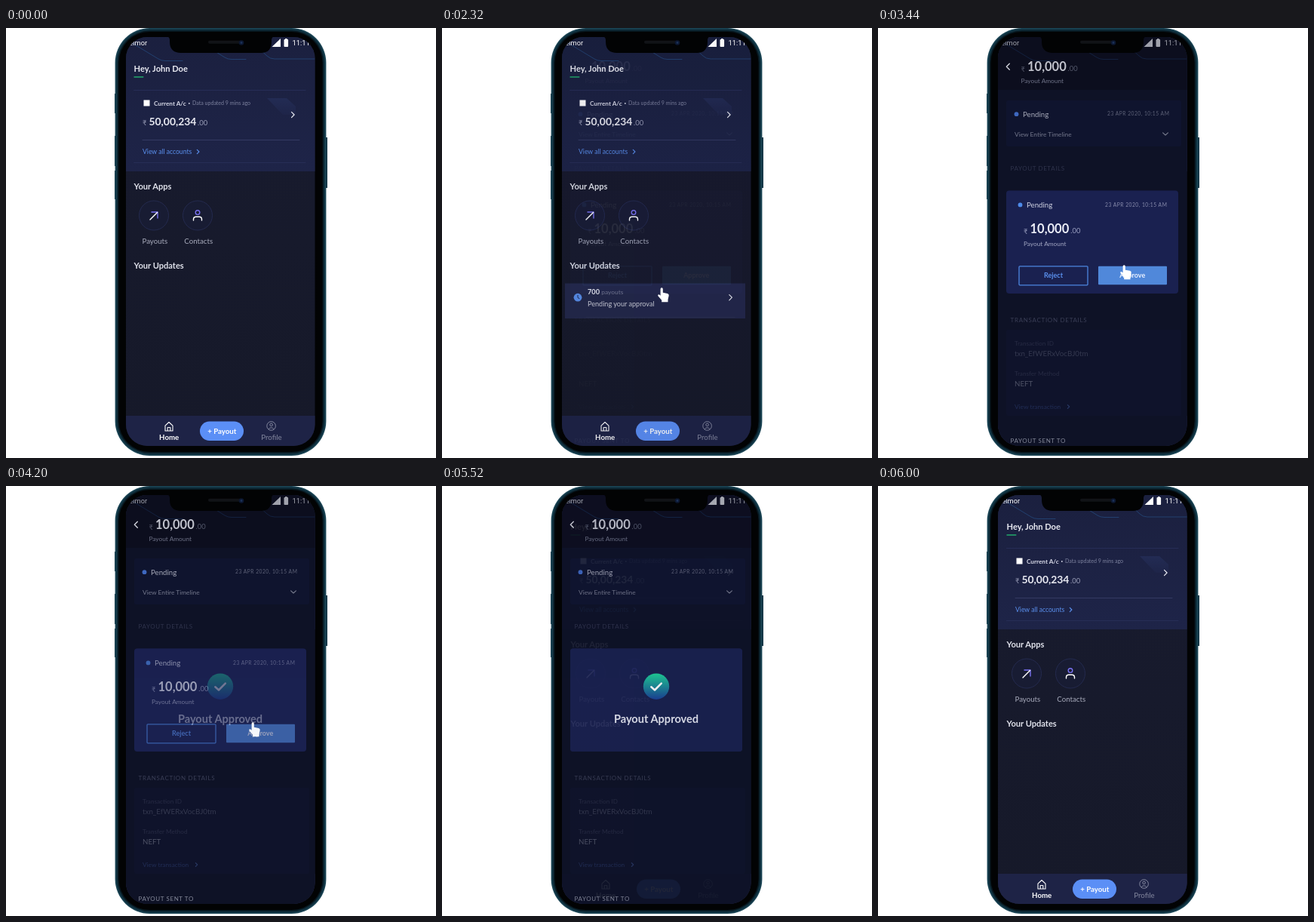
Write an HTML page that moves like this. It is 570 by 570 pixels and loops after 6040 ms.

```html
<!DOCTYPE html>
<html lang="en">
<head>
<meta charset="utf-8">
<title>Payout approval</title>
<style>
  html, body { margin: 0; width: 100%; height: 100%; overflow: hidden; background: #fff; }
  svg { display: block; width: 100vw; height: 100vh; }
  text { font-family: Lato, "Noto Sans", sans-serif; white-space: pre; }
  .status { font-family: Roboto, sans-serif; }
</style>
</head>
<body>
<svg id="stage" viewBox="0 0 570 570"></svg>
<script>
const LOOP = 6040, STEP = 40, FADE = 520;

// Markup helpers
const text = (x, y, size, fill, str, { w = 400, anchor = 'start', ls = 0, cls = '' } = {}) =>
  `<text x="${x}" y="${y}" font-size="${size}" fill="${fill}" font-weight="${w}" text-anchor="${anchor}" letter-spacing="${ls}" class="${cls}">${str}</text>`;
const rect = (x, y, w, h, fill, r = 0, extra = '') =>
  `<rect x="${x}" y="${y}" width="${w}" height="${h}" rx="${r}" fill="${fill}" ${extra}/>`;
const dot = (x, y, r, fill, extra = '') => `<circle cx="${x}" cy="${y}" r="${r}" fill="${fill}" ${extra}/>`;
const line = (d, stroke, w = 1) =>
  `<path d="${d}" fill="none" stroke="${stroke}" stroke-width="${w}" stroke-linecap="round" stroke-linejoin="round"/>`;
const right = (x, y, s, stroke, w = 1.2) => line(`M${x - s / 2} ${y - s}l${s} ${s}l${-s} ${s}`, stroke, w);
const group = (id, body) => `<g id="${id}">${body}</g>`;
const bold = { w: 700 }, mid = { anchor: 'middle' }, boldMid = { w: 700, anchor: 'middle' };

const statusBar = c =>
  text(187, 23.3, 9.2, c, 'Zelmor', { anchor: 'end', cls: 'status' }) +
  `<path d="M352.5 25L364 14V25Z" fill="${c}"/>` +
  rect(368.5, 15, 5.6, 10, c, 1) + rect(370, 14, 2.6, 2, c) +
  text(379.5, 23.3, 9.4, c, '11:11', { cls: 'status' });

const circuit = c =>
  line('M164 18L202 41Q206 43.5 211 43.5H234', c) +
  line('M266 24L290 39Q294 41.5 299 41.5H318', c) +
  line('M332 24L346 37Q350 41 356 41H409', c);

const amount = (x, y, size, main, dim, rupeeX, centsX, str) =>
  text(rupeeX, y + .5, 9.2, dim, '₹') +
  text(x, y, size, main, str, bold) +
  text(centsX, y, 9.4, dim, '.00');

const date = (x, y, c) => text(x, y, 6.7, c, '23 APR 2020, 10:15 AM', { ls: .5 });

const homeMarkup =
  rect(158, 11, 253, 545, 'url(#page)') +
  rect(158, 11, 253, 179, 'url(#header)') +
  circuit('#22406f') + statusBar('#fff') +
  text(169.5, 58, 11.1, '#e9eaf2', 'Hey, John Doe', bold) +
  rect(169.5, 64.2, 12.8, 1.5, '#22a86a') +
  line('M169.5 82.5H397M169.5 178.5H397', '#262d56') +
  `<path d="M346 93H372L384 104V115H367Z" fill="url(#sheen)"/>` +
  rect(182.5, 95.5, 8, 8, '#fff') +
  text(196, 102.6, 8.2, '#d8dae8', 'Current A/c', bold) +
  dot(242.8, 100, .9, '#d8dae8') +
  text(247, 102.3, 7.05, '#7d829f', 'Data updated 9 mins ago') +
  right(380.3, 115, 3.6, '#e9eaf2') +
  amount(189.5, 128.8, 13.9, '#e9eaf2', '#9a9eb8', 181, 254, '50,00,234') +
  line('M181 148.5H389', '#343a62') +
  text(181, 166.8, 8.6, '#5a90ee', 'View all accounts') +
  right(254.6, 164, 2.6, '#5a90ee', 1.1) +
  text(169.5, 214, 11.1, '#dfe1ea', 'Your Apps', bold) +
  [196, 254].map(x => dot(x, 248.5, 19.5, '#181c33', 'stroke="#242a4e"')).join('') +
  line('M193 244H201V252', '#7a72f2', 1.4) + line('M191 254L200.5 244.5', '#fff', 1.4) +
  dot(254, 244.6, 2.8, 'none', 'stroke="#7a72f2" stroke-width="1.4"') +
  line('M248.5 255V253.5Q248.5 250.3 252 250.3H256Q259.5 250.3 259.5 253.5V255', '#fff', 1.4) +
  text(197.4, 285.8, 9.7, '#a9acbd', 'Payouts', mid) +
  text(255.2, 285.8, 9.7, '#a9acbd', 'Contacts', mid) +
  text(169.5, 318.5, 11.1, '#dfe1ea', 'Your Updates', bold) +
  rect(158, 514, 253, 42, '#1e2346') +
  line('M211 527.2L216 522.5L221 527.2V534H211ZM214.2 534V529.5H217.8V534', '#fff', 1.1) +
  text(216.2, 546, 9.7, '#fff', 'Home', boldMid) +
  rect(257, 521.5, 58, 25.5, '#5b8ff6', 12.7) +
  text(286.3, 538, 9.7, '#fff', '+ Payout', boldMid) +
  dot(351.6, 527.5, 5.8, 'none', 'stroke="#84889f"') +
  dot(351.6, 525.9, 1.8, 'none', 'stroke="#84889f"') +
  line('M348.2 531.6Q351.6 527.6 355 531.6', '#84889f') +
  text(352, 546, 9.7, '#84889f', 'Profile', mid);

const updateMarkup =
  dot(180, 357.2, 5.4, '#5a90ee') + line('M180 354.3V357.4L182 358.6', '#1b2550', 1) +
  text(193, 353.2, 9.2, '#eceef5', '700', bold) +
  text(211.3, 353.2, 8.4, '#767a92', 'payouts') +
  text(193, 369, 9.1, '#cfd1dc', 'Pending your approval') +
  right(382.6, 357.2, 3.6, '#e9eaf2') +
  line('M191 383.5H388', '#2a2f4e');

const card = rect(170, 215.5, 228, 136.5, '#1a2150', 4);

const detailMarkup =
  rect(158, 11, 253, 545, '#0e1226') +
  rect(158, 11, 253, 71, '#0c0e1e') +
  circuit('#13213f') + statusBar('#a0a2ac') +
  line('M174.3 47.2L170.3 51.2L174.3 55.2', '#d4d6de', 1.3) +
  amount(198, 57, 16.5, '#c0c2cc', '#54586b', 189.5, 251.5, '10,000') +
  text(189.5, 73.3, 8.3, '#6e7287', 'Payout Amount') +
  rect(170, 96, 232, 61, '#0f142e', 2) +
  dot(183.5, 114.2, 2.9, '#3e68c0') +
  text(192, 117.7, 9.7, '#a6a9b8', 'Pending') + date(304, 116.4, '#5d6177') +
  text(181, 143.7, 8.4, '#74788c', 'View Entire Timeline') +
  line('M377.6 138.8L381 142L384.4 138.8', '#787c8e', 1.1) +
  text(175.5, 189.3, 8, '#2f334c', 'PAYOUT DETAILS', { ls: .6 }) +
  rect(170, 400, 232, 114, '#0f132b', 2) +
  text(175.5, 390.3, 8, '#3a3e56', 'TRANSACTION DETAILS', { ls: .7 }) +
  text(181, 421, 8.2, '#272b44', 'Transaction ID') +
  text(181, 434.8, 9.8, '#34384f', 'txn_EfWERxVocBJ0tm') +
  text(181, 461, 8.2, '#272b44', 'Transfer Method') +
  text(181, 475, 9.7, '#4e5266', 'NEFT') +
  text(181, 504.8, 8.3, '#212d55', 'View transaction') +
  right(252.5, 502, 2.4, '#2a3a66', 1.1) +
  text(175.5, 550.4, 8, '#85899a', 'PAYOUT SENT TO', { ls: .6 }) +
  card +
  dot(188.5, 234.4, 2.9, '#4e8bea') +
  text(197, 238, 9.7, '#d0d3e2', 'Pending') + date(301, 236.6, '#878bab') +
  amount(201.5, 272.4, 16.5, '#eceef8', '#9a9fc0', 193, 255.3, '10,000') +
  text(193, 288.5, 8.3, '#a2a6c2', 'Payout Amount') +
  rect(187, 315.8, 91, 25, 'none', 1, 'stroke="#4c86df" stroke-width="1.3"') +
  text(232.5, 331.3, 9, '#5a90ee', 'Reject', boldMid) +
  rect(292, 315.8, 91, 24.4, '#5088da', 1) +
  text(337.2, 331.3, 9, '#eaf1ff', 'Approve', boldMid);

const approvedMarkup =
  card + dot(284, 265.7, 17.2, 'url(#badge)') +
  line('M277.3 266.3L282 270.5L290.8 261.6', '#fff', 2.5) +
  text(284, 314, 14.6, '#e6e8f4', 'Payout Approved', boldMid);

// Phone rim: nested rounded shells, from teal to black
const shell = (inset, fill) => rect(144.6 + inset, inset, 279.8 - 2 * inset, 567 - 2 * inset, fill, 46 - inset);
const bodyMarkup =
  [[87, 26], [143, 40], [189, 38]].map(([y, h]) => rect(144, y, 2, h, '#123444')).join('') +
  rect(423.5, 145, 2.5, 67, '#123444') +
  shell(0, '#1a4454') + shell(1.6, '#0f2f3d') + shell(3.4, '#07171f') + shell(5, '#020304');

const notchMarkup =
  `<path d="M213 11Q217 12 217 16V18Q217 33 232 33H338Q352 33 352 18V16Q352 12 356 11Z" fill="#020304"/>` +
  rect(268, 16.8, 46, 4, '#111317', 2) + dot(312, 19.5, 3.3, '#0c1730') + dot(312, 19.5, 1.4, '#1b3158');

const handMarkup = `<path d="M3.6 1.6a1.6 1.6 0 0 1 3.2 0V6.5L12.8 7.7Q15.1 8.3 14.7 10.5L13.5 15.6V19H5.2V16.4L.4 10.9Q-.2 9.5 1 8.9Q2.2 8.6 3.6 10.4Z" fill="#fff"/>`;

const gradient = (id, a, b, op = 1) =>
  `<linearGradient id="${id}" x2="0" y2="1"><stop stop-color="${a}" stop-opacity="${op}"/><stop offset="1" stop-color="${b}" stop-opacity="${op}"/></linearGradient>`;

const stage = document.getElementById('stage');
stage.innerHTML =
  `<defs>${gradient('page', '#181b2f', '#161929')}${gradient('header', '#1b203f', '#1e2448')}
   ${gradient('sheen', '#2a3768', '#20274e', .45)}${gradient('badge', '#1fd39a', '#1c429a')}
   <clipPath id="glass"><rect x="159" y="12" width="250.5" height="542" rx="28"/></clipPath></defs>` +
  group('body', bodyMarkup) +
  `<g clip-path="url(#glass)">` +
  group('home', homeMarkup) +
  group('pressed', rect(163, 338.5, 239, 46.5, '#23284b')) +
  group('update', updateMarkup) +
  group('detail', detailMarkup) +
  group('approved', approvedMarkup) +
  group('hand', handMarkup) +
  group('back', homeMarkup) +
  `</g>` +
  group('notch', notchMarkup);

const el = Object.fromEntries([...stage.querySelectorAll('g[id]')].map(g => [g.id, g]));
const clamp = v => Math.min(1, Math.max(0, v));
const easeOut = p => 1 - (1 - p) ** 3;
const easeIn = p => p ** 3;
const fade = (t, start) => clamp((t - start + STEP) / FADE);
const show = (g, v) => g.setAttribute('opacity', v);
const move = (g, x, y) => g.setAttribute('transform', `translate(${x} ${y})`);

function draw(ms) {
  const t = Math.floor(ms / STEP) * STEP;
  const approved = fade(t, 4040);
  const glide = easeOut(clamp((t - 2790) / 930));

  show(el.update, fade(t, 560));
  show(el.pressed, t >= 2320 ? 1 : 0);
  show(el.detail, fade(t, 2320));
  show(el.approved, approved);
  show(el.hand, easeOut(clamp((t - 1040) / 960)) * (1 - easeIn(approved)));
  move(el.hand, 286 + 36 * glide, 344.3 - 31 * glide);
  show(el.back, fade(t, 5520));
}

move(el.back, 1, 0);
const begin = performance.now();
function tick() {
  draw((performance.now() - begin) % LOOP);
  requestAnimationFrame(tick);
}
tick();
</script>
</body>
</html>
```
